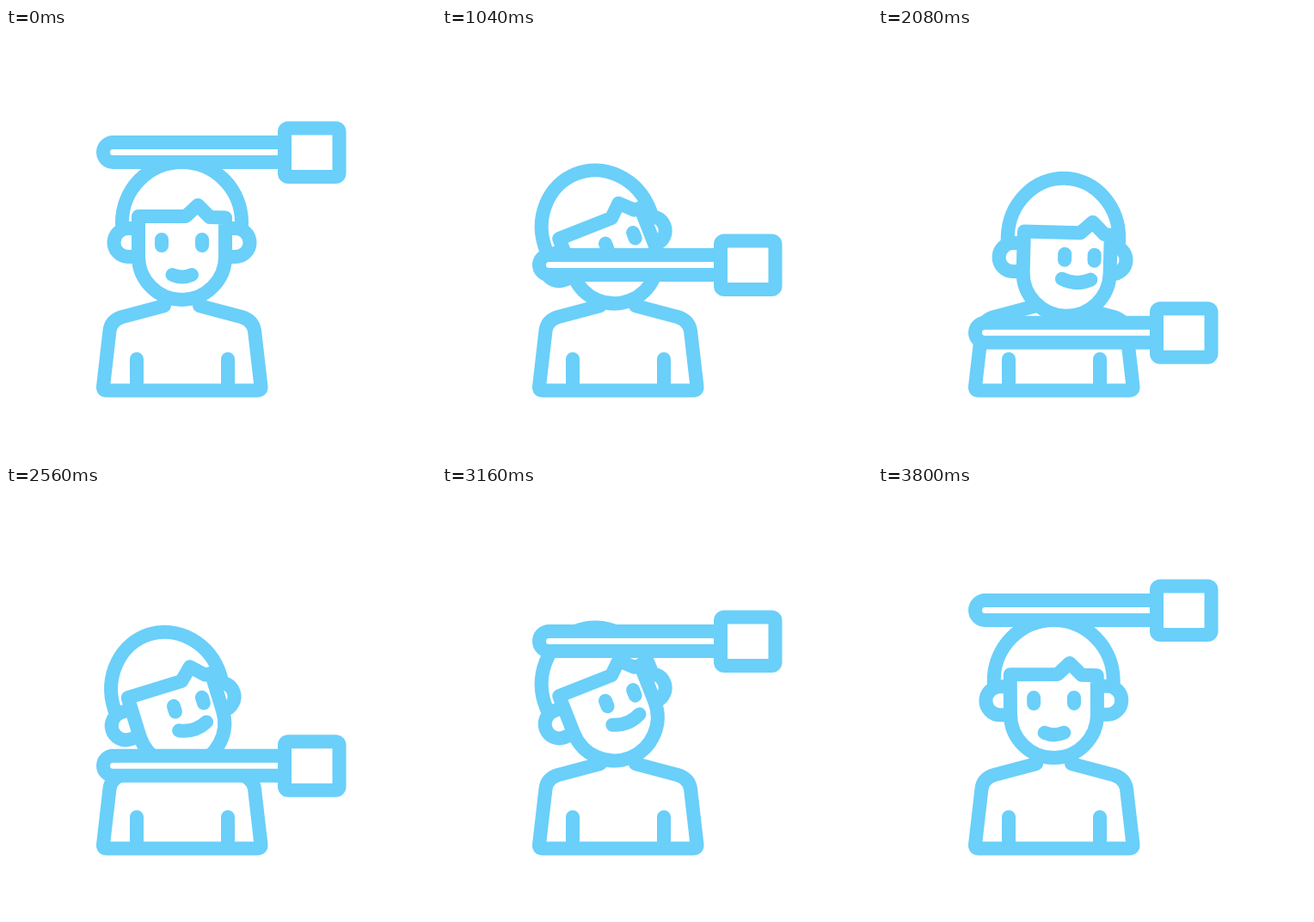
An HTML page for the animation above (4800 ms loop, 500 by 500 pixels).

```html
<!DOCTYPE html>
<html lang="en">
<head>
<meta charset="utf-8">
<style>
  html, body { margin: 0; width: 100%; height: 100%; overflow: hidden; background: #fff; }
  svg { display: block; width: 100%; height: 100%; }
  svg * { stroke-linecap: round; stroke-linejoin: round; }
</style>
</head>
<body>
<svg viewBox="0 0 500 500" fill="none" stroke="#6acff9" stroke-width="16">
  <path d="M184 323L135 336Q122 340 120.500 352L113 417Q112.500 421.500 117 421.500H292Q297 421.500 296.500 417L289 352Q287 340 274 336L225 323M152 385V421.500M258 385V421.500"/>
  <g id="head">
    <path id="ears"/>
    <path id="hair"/>
    <path id="face" fill="#fff"/>
    <path id="features"/>
  </g>
  <g id="scanner" fill="#fff">
    <path d="M324 133H124.500a11.500 11.500 0 0 0 0 23H324"/>
    <rect x="324" y="116.500" width="63.500" height="56.500" rx="4"/>
  </g>
</svg>
<script>
const LOOP = 4800, STEP = 40, TRAVEL = 1920, DROP = 211;
const el = id => document.getElementById(id);
const clamp = v => Math.max(0, Math.min(1, v));
const mix = (a, b, k) => a + (b - a) * k;
const smooth = p => p * p * (3 - 2 * p);

// cubic-bezier(.667, 0, .333, 1)
function ease(p) {
  let lo = 0, hi = 1;
  for (let i = 0; i < 24; i++) {
    const m = (lo + hi) / 2;
    if (2 * m - 3 * m * m + 2 * m ** 3 < p) lo = m; else hi = m;
  }
  return smooth(lo);
}

// k: 0 looks straight ahead, 1 looks to the side
function shapeHead(k) {
  const m = (a, b) => mix(a, b, k);
  const fringe = m(0, 10.5);
  el('ears').setAttribute('d',
    `M-50.5-32.5H-62.500a16.500 16.500 0 0 0 0 33H-50.5` +
    `M50.5-32.5H${m(62.5, 52.5)}a16.500 16.500 0 0 1 0 33H50.5`);
  el('hair').setAttribute('d',
    `M-69.500-37V-39.500A${m(69.5, 64.75)} 70 0 0 1 ${m(69.5, 60)}-39.500V-37`);
  el('face').setAttribute('d',
    `M-50.500-46.500H${4.5 + fringe}L${18.5 + fringe}-59.500L${32.5 + fringe}-45.500` +
    `L50.500-45V0A50.500 50.500 0 0 1-50.500 0Z`);
  const eyeY = m(-19.5, -21.5), mouthY = m(21.5, 7.5);
  el('features').setAttribute('d',
    `M${m(-23.5, -2.5)} ${eyeY}v7M${m(23.5, 32)} ${eyeY}v7` +
    `M${m(-11, -5)} ${mouthY}Q${m(0.25, 11.75)} ${mouthY + m(5, 8)} ${m(11.5, 28.5)} ${mouthY}`);
}

function draw(t) {
  const p = t < TRAVEL ? t / TRAVEL : clamp(2 - t / TRAVEL);
  el('scanner').setAttribute('transform', `translate(0 ${DROP * ease(p)})`);

  const turn = smooth(clamp(Math.min(t, 2 * TRAVEL - t) / 640));
  const away = Math.abs(t - 1960);
  const sink = clamp(1 - away / 960);
  const swing = smooth(clamp(1 - away / 820));
  const x = mix(204.5, 217.8, turn);
  const y = 313.5 + 21.5 * sink;
  const angle = -21.5 * turn + 24.5 * swing;
  shapeHead(turn);
  el('head').setAttribute('transform',
    `translate(${x} ${y}) rotate(${angle}) translate(0 -48)`);
}

function tick() {
  const t = performance.now() % LOOP;
  draw(Math.floor(t / STEP) * STEP);
  requestAnimationFrame(tick);
}
tick();
</script>
</body>
</html>
```
